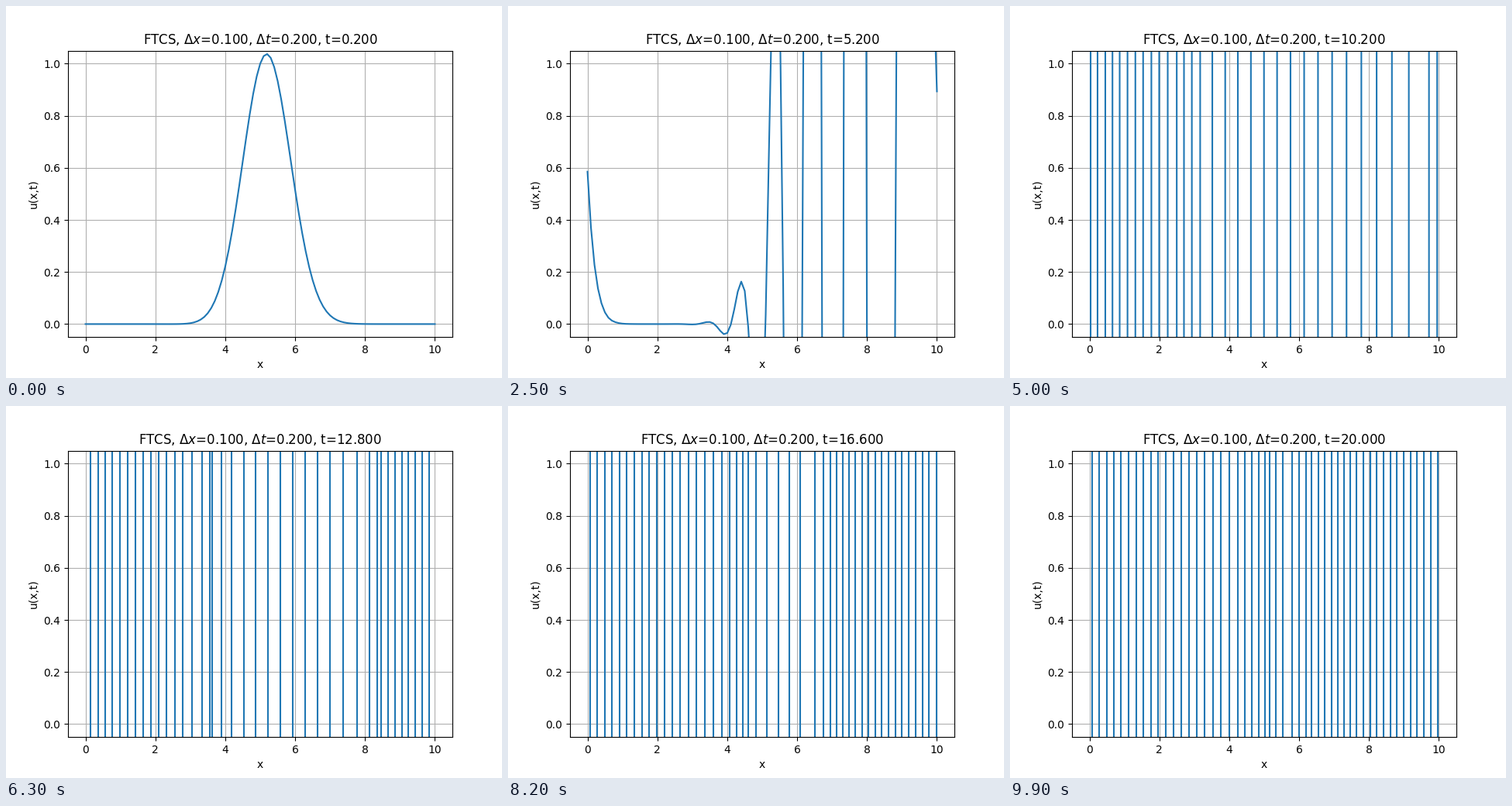
Write a matplotlib script that moves like this. It is 640 px wide and 480 px high and loops after 10000 ms.

```python
import numpy as np
import matplotlib.pyplot as plt
from matplotlib.animation import FuncAnimation

# Unstable FTCS scheme for u_t + c u_x = 0 with periodic wrap-around
LENGTH = 10.0
DX = 0.1
DT = 0.2
SPEED = 1.0
STEPS = 100


def ftcs_step(u):
    k = SPEED * DT / (2 * DX)
    return u - k * (np.roll(u, -1) - np.roll(u, 1))


x = np.linspace(0, LENGTH, round(LENGTH / DX) + 1)
history = [np.exp(-(x - LENGTH / 2) ** 2)]
for _ in range(STEPS):
    history.append(ftcs_step(history[-1]))

fig, ax = plt.subplots(figsize=(6.4, 4.8), dpi=100)
line, = ax.plot(x, history[0])
ax.set_xlim(-0.5, 10.5)
ax.set_ylim(-0.05, 1.05)
ax.set_xlabel("x")
ax.set_ylabel("u(x,t)")
ax.grid(True)
title = ax.set_title("")


def update(i):
    step = i + 1
    line.set_ydata(history[step])
    title.set_text(
        rf"FTCS, $\Delta x$={DX:.3f}, $\Delta t$={DT:.3f}, t={step * DT:.3f}"
    )
    return line, title


anim = FuncAnimation(fig, update, frames=STEPS, init_func=lambda: update(0),
                     interval=100, repeat=True, repeat_delay=0)
plt.show()
```
